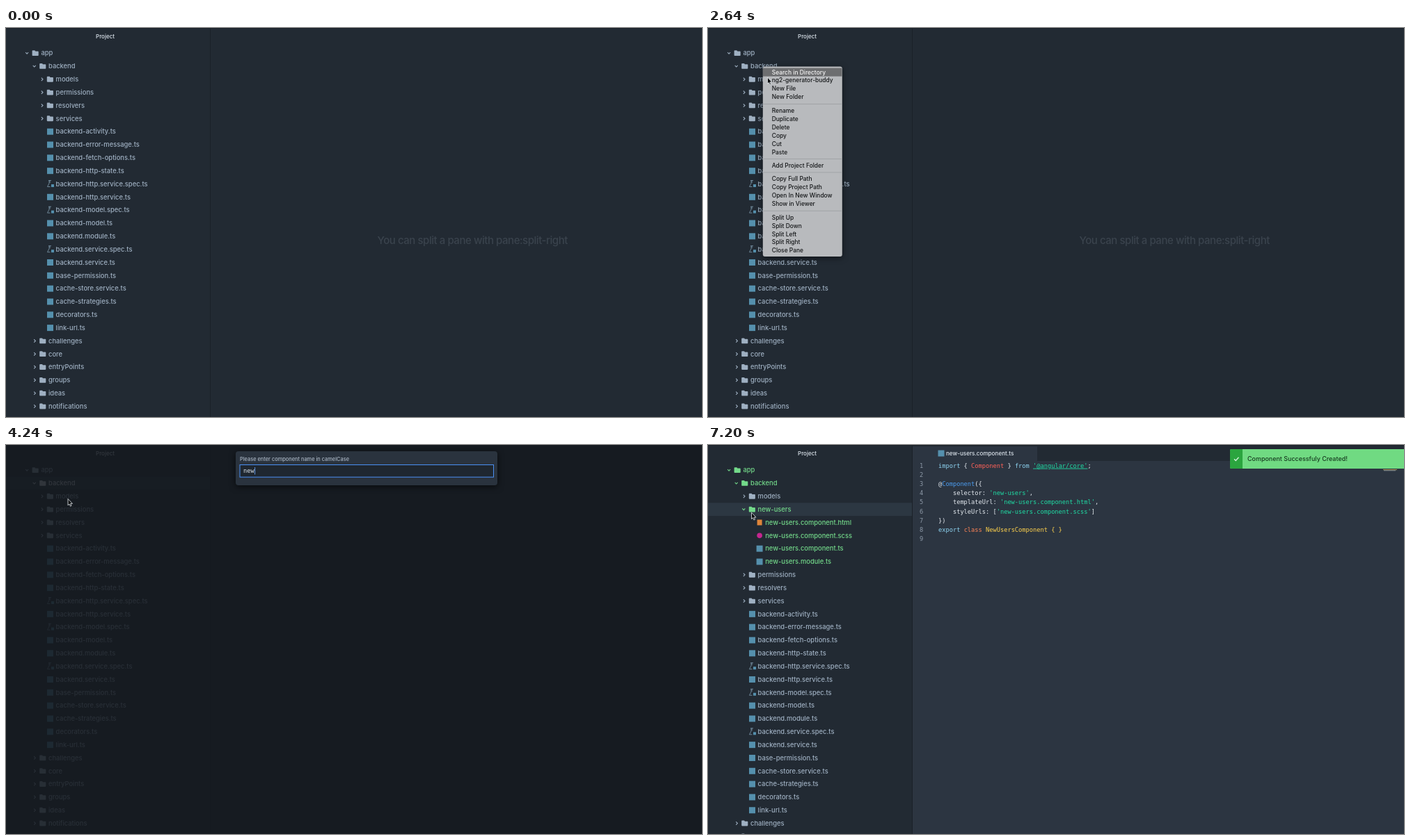
Write an HTML page that moves like this. It is 1000 px wide and 560 px high and loops after 8 s.

```html
<!DOCTYPE html>
<html lang="en">
<head>
<meta charset="utf-8">
<style>
  html, body { margin: 0; width: 100%; height: 100%; overflow: hidden; background: #222a33; }
  svg { display: block; width: 1000px; height: 560px; }
  text { font-family: Inter, "Open Sans", sans-serif; font-weight: 500; white-space: pre; }
  .mono { font-family: "DejaVu Sans Mono", monospace; font-weight: 400; }
</style>
</head>
<body>
<svg id="stage" viewBox="0 0 1000 560"></svg>
<script>
const LOOP = 8000, STEP = 80, ROW = 18.83;
const GREEN = '#73d98a', TS_BLUE = '#5590ad', MUTED = '#9fb0c2', BRIGHT = '#dce4ec';
const stage = document.getElementById('stage');

const clamp = v => Math.max(0, Math.min(1, v));
const rect = (x, y, w, h, fill, extra = '') =>
  `<rect x="${x}" y="${y}" width="${w}" height="${h}" fill="${fill}" ${extra}/>`;
const path = (d, extra) => `<path d="${d}" ${extra}/>`;
// Text is placed by its vertical middle.
const text = (x, y, size, fill, s, extra = '') =>
  `<text x="${x}" y="${y + size * .35}" font-size="${size}" fill="${fill}" ${extra}>${s}</text>`;
const mono = (x, y, fill, s) => text(x, y, 8.7, fill, s, 'class="mono"');

// Tree
const folders = (depth, names) => names.split(' ').map(name => ({ depth, name, folder: true }));
const files = (depth, names) => names.split(' ').map(name => ({ depth, name }));
const backendFiles = 'backend-activity backend-error-message backend-fetch-options backend-http-state ' +
  'backend-http.service.spec backend-http.service backend-model.spec backend-model backend.module ' +
  'backend.service.spec backend.service base-permission cache-store.service cache-strategies decorators link-url';
const newFiles = 'new-users.component.html new-users.component.scss new-users.component.ts new-users.module.ts';

function treeRows(created, expanded) {
  return [
    ...folders(0, 'app'), ...folders(1, 'backend'), ...folders(2, 'models'),
    ...(created ? folders(2, 'new-users') : []),
    ...(expanded ? files(3, newFiles) : []),
    ...folders(2, 'permissions resolvers services'),
    ...files(2, backendFiles.replace(/\S+/g, '$&.ts')),
    ...folders(1, 'challenges core entryPoints groups ideas notifications')
  ];
}

function fileIcon(name, x, y) {
  if (name.endsWith('.html')) return rect(x + 1, y - 4, 7, 8, '#e0853a');
  if (name.endsWith('.scss')) return `<circle cx="${x + 4.5}" cy="${y}" r="3.8" fill="#c4268f"/>`;
  if (!name.includes('.spec')) return rect(x, y - 4.5, 9, 9, TS_BLUE);
  return path(`M${x + 2} ${y - 5}h4m-3 0v4l-2.5 5h4m-.5 -9v3.5`,
    'fill="none" stroke="#7f9bae" stroke-width=".8"') + rect(x + 6, y + .5, 4, 4, TS_BLUE);
}

function tree(t) {
  const expanded = t >= 7120;
  const selected = t < 3520 ? '' : t < 7040 ? 'backend' : 'new-users';
  const open = ['app', 'backend', expanded ? 'new-users' : ''];
  const changed = t >= 6480 ? ['app', 'backend', 'new-users'] : [];
  return treeRows(t >= 6000, expanded).map(({ depth, name, folder }, i) => {
    const y = 36.2 + ROW * i, x = 37.6 + 10.6 * depth;
    const isNew = changed.includes(name) || depth === 3;
    const color = isNew ? GREEN : name === selected ? BRIGHT : MUTED;
    const strip = name === selected ? rect(0, y - 9.4, 293, 18.8, '#2c3742') : '';
    const chevron = open.includes(name)
      ? `M${x - 9.5} ${y - 1.2}l2 2.2 2-2.2` : `M${x - 8} ${y - 2.2}l2.2 2.2-2.2 2.2`;
    const icon = folder
      ? path(chevron, `fill="none" stroke="${color}" stroke-width="1.1"`) +
        path(`M${x} ${y - 3.2}q0-.8.8-.8h3l1 1.2h3.5q.8 0 .8.8v5q0 .8-.8.8h-7.5q-.8 0-.8-.8z`, `fill="${color}"`)
      : fileIcon(name, x + .2, y);
    return strip + icon + text(x + 12.8, y, 9.37, color, name);
  }).join('');
}

// Editor
const span = (fill, s, extra = '') => `<tspan fill="${fill}" ${extra}>${s}</tspan>`;
const key = s => span('#8fd6f4', s);
const str = s => span('#1fdca4', `'${s}'`);
const code = [
  `${key('import')} { ${span('#ff6259', 'Component')} } ${key('from')} ` +
    span('#1fdca4', "'@angular/core'", 'text-decoration="underline"') + ';',
  '',
  `@${span('#4c9df0', 'Component')}({`,
  `    selector: ${str('new-users')},`,
  `    templateUrl: ${str('new-users.component.html')},`,
  `    styleUrls: [${str('new-users.component.scss')}]`,
  '})',
  `${key('export')} ${span('#ff8457', 'class')} ${span('#ffd24d', 'NewUsersComponent { }')}`,
  ''
];

function editor() {
  const lines = code.map((line, i) => {
    const y = 29.6 + 13.2 * i;
    return mono(304, y, '#8c98a6', i + 1) + mono(331, y, '#e3e9ef', line);
  }).join('');
  return rect(294, 23, 706, 537, '#2c3541') + rect(294, 2, 179, 22, '#2c3541') +
    rect(330.5, 7.5, 9, 9, TS_BLUE) + text(342, 12, 8.1, BRIGHT, 'new-users.component.ts') +
    lines + rect(970, 35, 20, .8, '#c9a34e') + rect(971, 36.5, 17, .7, '#aab4be');
}

function notification(t) {
  const dx = 250 * (1 - clamp((t - 6000) / 240));
  return `<g transform="translate(${dx} 0)">` +
    rect(750, 6, 254, 28, '#70da82', 'rx="2"') +
    path('M768 6h-16q-2 0-2 2v24q0 2 2 2h16z', 'fill="#2ba53f"') +
    path('M756 20.2l2.3 2.3 4.2-4.7', 'fill="none" stroke="#d5f5db" stroke-width="1.3"') +
    text(775, 20, 8.95, '#173b20', 'Component Successfuly Created!') + '</g>';
}

// Context menu
const menuGroups = [
  ['Search in Directory', 'ng2-generator-buddy', 'New File', 'New Folder'],
  ['Rename', 'Duplicate', 'Delete', 'Copy', 'Cut', 'Paste'],
  ['Add Project Folder'],
  ['Copy Full Path', 'Copy Project Path', 'Open In New Window', 'Show in Viewer'],
  ['Split Up', 'Split Down', 'Split Left', 'Split Right', 'Close Pane']
];

function menu(t) {
  if (t < 2320 || t >= 3440) return '';
  const active = t < 2640 || t === 3120 ? '' : menuGroups[0][t < 2720 ? 0 : 1];
  const opacity = t < 3280 ? 1 : t < 3360 ? .6 : .25;
  let y = 63.6, out = '';
  menuGroups.forEach((group, g) => {
    if (g) {
      out += rect(79, y - 2.4, 113.5, .8, '#9b9ea1');
      y += 7.5;
    }
    for (const item of group) {
      const on = item === active;
      if (on) out += rect(79, y - 6, 113.5, 12, '#6d6e70');
      out += text(91.7, y, 8.45, on ? '#f5f5f5' : '#16181a', item);
      y += 11.94;
    }
  });
  return `<g opacity="${opacity}">` +
    rect(78.8, 55.5, 114, 273.5, '#b8babd', 'rx="3" style="filter:drop-shadow(0 2px 4px #0008)"') + out + '</g>';
}

// Prompt
const keyTimes = [4000, 4080, 4240, 4640, 4880, 5120, 5280, 5360];

function prompt(t) {
  if (t < 3520 || t >= 6000) return '';
  const fade = clamp((t - 3440) / 400);
  const count = keyTimes.filter(k => k <= t).length;
  const caretOn = count && t - keyTimes[count - 1] < 320;
  return rect(0, 0, 1000, 560, '#14191f', `opacity="${.86 * fade}"`) + `<g opacity="${fade}">` +
    rect(330, 9, 376, 49, '#2a333e', 'rx="4" style="filter:drop-shadow(0 2px 5px #0009)"') +
    text(336, 20, 7.4, '#a9b5c3', 'Please enter component name in camelCase') +
    rect(336, 28.5, 364.5, 17.7, '#1f2730', 'stroke="#4a8ff2"') +
    mono(341, 37.3, BRIGHT, 'newUsers'.slice(0, count)) +
    (caretOn ? rect(341.5 + 5.24 * count, 32, .9, 10.5, '#6ba4f5') : '') + '</g>';
}

// Pointer: time, x, y
const pointerPath = [
  [240, 371, 494], [320, 250, 385], [400, 167, 309], [560, 167, 309], [640, 173, 314],
  [720, 158, 302], [880, 158, 302], [960, 166, 308], [1040, 160, 288], [1360, 112, 150],
  [1600, 86, 76], [1760, 80, 60], [2000, 79, 57.5], [2560, 79, 57.5], [2640, 85.5, 71],
  [2800, 89, 81], [2960, 89, 77.5], [6400, 89, 77.5], [6720, 74, 90], [7040, 62.5, 97.2]
];

function pointer(t) {
  if (t < pointerPath[0][0]) return '';
  const i = pointerPath.findIndex(p => p[0] > t);
  const b = pointerPath.at(i), a = i < 0 ? b : pointerPath[i - 1];
  const p = i < 0 ? 0 : (t - a[0]) / (b[0] - a[0]);
  const x = a[1] + (b[1] - a[1]) * p, y = a[2] + (b[2] - a[2]) * p;
  return path('M0 0V9.3L2 7.5 3.4 10.7 5 10 3.6 6.9H6.5Z',
    `transform="translate(${x} ${y})" fill="#0b0d0f" stroke="#e8ecf0" stroke-width=".8"`);
}

function scene(t) {
  return rect(0, 0, 1000, 560, '#222a33') + tree(t) +
    text(142.5, 12, 8, BRIGHT, 'Project', 'text-anchor="middle"') +
    (t < 3840 ? text(533.5, 306, 15, '#3a434d', 'You can split a pane with pane:split-right',
      'letter-spacing="-.45"') : '') +
    (t >= 6080 ? editor() : '') +
    rect(293, 0, 1, 560, '#1a2128') + rect(0, 0, 1000, 1, '#192027') +
    (t >= 6080 ? notification(t) : '') + menu(t) + prompt(t) + pointer(t);
}

let shown = -1;
function tick() {
  const t = Math.floor(performance.now() % LOOP / STEP) * STEP;
  if (t !== shown) stage.innerHTML = scene(shown = t);
  requestAnimationFrame(tick);
}
tick();
</script>
</body>
</html>
```
